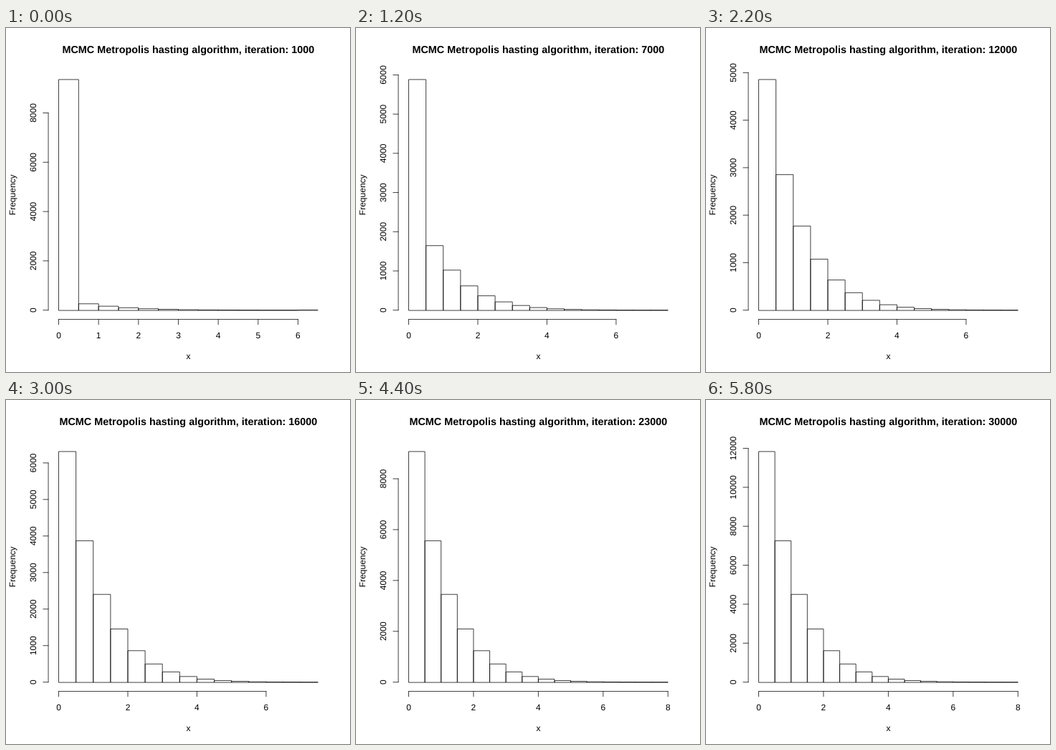
An HTML page that plays this animation: 480 px wide and 480 px high, repeating every 6000 ms.

```html
<!DOCTYPE html>
<html lang="en">
<head>
<meta charset="utf-8">
<title>Histogram of a growing sample</title>
<style>
  html, body { margin: 0; width: 100%; height: 100%; overflow: hidden; background: #fff; }
  svg { display: block; width: 480px; height: 480px; }
  path { fill: none; stroke: #000; stroke-width: 0.75; stroke-linecap: round; stroke-linejoin: round; }
  text {
    font: 12px "Liberation Sans", Arial, sans-serif;
    text-anchor: middle;
    text-rendering: geometricPrecision;
  }
  .title { font-weight: bold; font-size: 14.4px; }
</style>
</head>
<body>
<svg viewBox="0 0 480 480">
  <text class="title" x="254.4" y="35"></text>
  <text x="254.4" y="462">x</text>
  <text transform="translate(12.96 232.8) rotate(-90)">Frequency</text>
  <g></g>
</svg>
<script>
const STEP_MS = 200, STEPS = 30, PRESET = 10000;

// Plot region, with the data inset by 4% of its range on every side.
const X0 = 59.04, X1 = 449.76, Y0 = 59.04, Y1 = 406.56, TICK = 7.2;
const WIDTH = (X1 - X0) / 1.08, HEIGHT = (Y1 - Y0) / 1.08;
const LEFT = X0 + WIDTH * 0.04, BASE = Y1 - HEIGHT * 0.04;

// Iteration and the share of samples beyond the first bin.
const BEYOND = [[1000, 0.645], [7000, 0.5883], [12000, 0.5952], [16000, 0.6055], [30000, 0.6055]];

const title = document.querySelector(".title");
const plot = document.querySelector("g");
const sum = list => list.reduce((s, v) => s + v, 0);
const line = d => `<path d="${d}"/>`;

function beyond(n) {
  const i = BEYOND.findIndex(([at], j) => j && at >= n);
  const [n0, v0] = BEYOND[i - 1], [n1, v1] = BEYOND[i];
  return v0 + (v1 - v0) * (n - n0) / (n1 - n0);
}

// Nearly exponential decay; unfilled preset slots are zeros in the first bin.
function binCounts(n, bins) {
  const weights = Array.from({ length: bins - 1 }, (_, k) => Math.exp(-0.465 * k - 0.012 * k * k));
  const scale = n * beyond(n) / sum(weights);
  const rest = weights.map(w => Math.round(w * scale));
  return [Math.max(n, PRESET) - sum(rest), ...rest];
}

// Round tick distance for about five intervals.
function tickStep(max) {
  const cell = max * 1.08 / 5;
  const base = 10 ** Math.floor(Math.log10(cell));
  let unit = base;
  for (const [m, bias] of [[2, 0.8], [5, 1.7], [10, 1.125]]) {
    if (m * base - cell >= bias * (cell - unit)) break;
    unit = m * base;
  }
  return unit;
}

function ticks(max) {
  const step = tickStep(max), list = [];
  for (let v = 0; v <= max * 1.04; v += step) list.push(v);
  return list;
}

function draw(n) {
  const xMax = n < 4000 ? 6.5 : n < 18000 ? 7.5 : 8;
  const counts = binCounts(n, xMax * 2);
  const yMax = counts[0];
  const px = v => LEFT + v / xMax * WIDTH;
  const py = v => BASE - v / yMax * HEIGHT;
  const xs = ticks(xMax), ys = ticks(yMax);

  let out = counts.map((c, i) =>
    line(`M${px(i / 2)} ${BASE}V${py(c)}H${px((i + 1) / 2)}V${BASE}Z`)).join("");

  out += line(`M${LEFT} ${Y1}H${px(xs.at(-1))}`);
  out += line(`M${X0} ${BASE}V${py(ys.at(-1))}`);
  for (const v of xs) {
    out += line(`M${px(v)} ${Y1}v${TICK}`);
    out += `<text x="${px(v)}" y="433">${v}</text>`;
  }
  for (const v of ys) {
    out += line(`M${X0} ${py(v)}h${-TICK}`);
    out += `<text transform="translate(41.76 ${py(v)}) rotate(-90)">${v}</text>`;
  }

  plot.innerHTML = out;
  title.textContent = `MCMC Metropolis hasting algorithm, iteration: ${n}`;
}

let shown = -1;
function tick() {
  const step = Math.floor(performance.now() / STEP_MS) % STEPS;
  if (step !== shown) draw((step + 1) * 1000);
  shown = step;
  requestAnimationFrame(tick);
}
tick();
</script>
</body>
</html>
```
